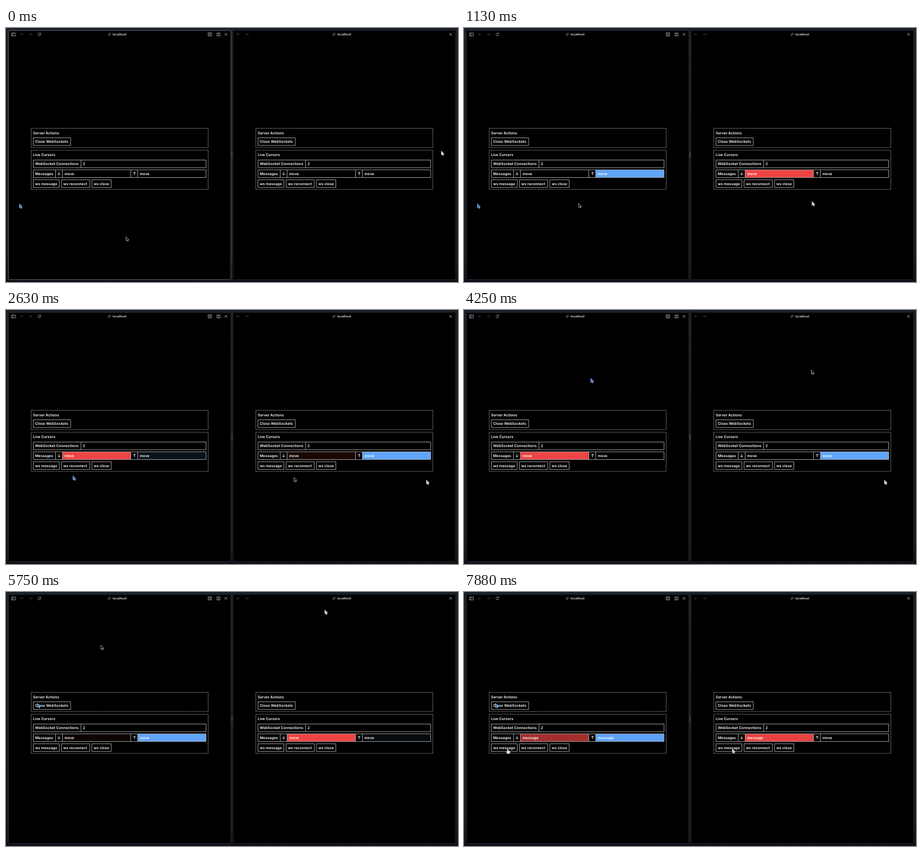
An HTML page with a canvas that plays this animation: 853x480 px, repeating every 8000 ms.

```html
<!DOCTYPE html>
<html lang="en">
<head>
<meta charset="utf-8">
<title>Live cursors</title>
<style>
  html, body { margin: 0; width: 100%; height: 100%; overflow: hidden; background: #000; }
  canvas { display: block; }
</style>
</head>
<body>
<canvas id="stage" width="853" height="480"></canvas>
<script>
const ctx = document.getElementById('stage').getContext('2d');
const LOOP = 8000, STEP = 125, LAG = 90, PANE = 424, CLICK = 7710;
const RED = '#ef4444', BLUE = '#60a5fa', LINE = '#a4a4a4';

// Turning points of the pointer: time, x, y
const path = [
  [0, 226, 394], [750, 304, 278], [1125, 216, 331], [1500, 250, 205], [1875, 369, 321],
  [2250, 539, 301], [2625, 543, 316], [3000, 485, 310], [3400, 610, 145], [3800, 650, 230],
  [4250, 655, 113], [4625, 540, 170], [4990, 483, 210], [5160, 308, 201], [5250, 303, 200],
  [5620, 180, 20], [6020, 230, 340], [6280, 366, 250], [6660, 114, 268], [6750, 103, 275],
  [7000, 54, 296], [7300, 82, 296]
];
// Spans during which the pointer is inside each window
const inLeft = [[250, 1875], [5090, 7345]];
const inRight = [[2000, 4990]];
const click = [CLICK, LOOP];

const clamp = v => Math.max(0, Math.min(1, v));

// Smooth curve through the turning points
function pointer(t) {
  const last = path.length - 1;
  if (t >= path[last][0]) return path[last].slice(1);
  const i = path.findIndex(p => p[0] > t) - 1;
  const a = path[Math.max(0, i - 1)], b = path[i], c = path[i + 1], d = path[Math.min(last, i + 2)];
  const span = c[0] - b[0], s = (t - b[0]) / span;
  return [1, 2].map(k => {
    const m0 = (c[k] - a[k]) / (c[0] - a[0]) * span;
    const m1 = (d[k] - b[k]) / (d[0] - b[0]) * span;
    return b[k] + s * (m0 + s * (3 * (c[k] - b[k]) - 2 * m0 - m1 + s * (2 * (b[k] - c[k]) + m0 + m1)));
  });
}

// Delayed position, resting where the pointer last left the window
function remote(t, spans, rest, shift) {
  const started = spans.filter(s => s[0] <= t - LAG);
  if (!started.length) return rest;
  const [x, y] = pointer(Math.min(t - LAG, started.at(-1)[1]));
  return [x + shift, y];
}

const flash = (t, spans) => Math.max(...spans.map(([from, to]) =>
  clamp(Math.min((t - from) / 240, 1 - (t - to - 525) / 250))));

function text(str, x, y, size = 6.9, color = '#fff') {
  ctx.font = `600 ${size}px Inter, sans-serif`;
  ctx.fillStyle = color;
  ctx.fillText(str, x, y);
}

function stroke(d, color = LINE, width = 1) {
  ctx.strokeStyle = color;
  ctx.lineWidth = width;
  ctx.stroke(new Path2D(d));
}

function box(x, y, right, bottom) {
  stroke(`M${x} ${y}H${right}V${bottom}H${x}Z`);
}

function section(title, top, bottom) {
  ctx.setLineDash([1.5, 1]);
  box(47.5, top, 381.5, bottom);
  ctx.setLineDash([]);
  text(title, 51, top + 11.3);
}

function button(label, x, y, right) {
  box(x, y, right, y + 14.5);
  text(label, x + 3.5, y + 9.7);
}

function bar(x, label, color, level) {
  ctx.globalAlpha = level;
  ctx.fillStyle = color;
  ctx.fillRect(x, 268, 128.5, 14);
  ctx.globalAlpha = 1;
  text(label, x + 3.4, 277.7);
}

function pane(shift, down, up, downLabel, upLabel) {
  ctx.save();
  ctx.translate(shift, 0);
  section('Server Actions', 189.5, 226);
  section('Live Cursors', 231, 305);
  button('Close WebSockets', 51.5, 207.5, 122);

  button('WebSocket Connections', 51.5, 249.5, 377.5);
  stroke('M141.5 249.5v14.5');
  text('2', 145, 259.2);

  bar(107, downLabel, RED, down);
  bar(249, upLabel, BLUE, up);
  button('Messages', 51.5, 268, 377.5);
  stroke('M93.5 268v14M106.5 268v14M235.5 268v14M248.5 268v14');
  stroke('M100 272v6M97.5 275.5l2.5 2.5 2.5-2.5M242.5 278v-6M240 274.5l2.5-2.5 2.5 2.5', '#fff', .9);

  button('ws message', 51.5, 286.8, 100.5);
  button('ws reconnect', 104.5, 286.8, 158);
  button('ws close', 162, 286.8, 198.5);

  stroke('M194.2 10.8l1-1a1.5 1.5 0 0 1 2 2l-1.2 1.2M195.8 13.2l-1 1a1.5 1.5 0 0 1-2-2l1.2-1.2M194 13l2-2', '#aaa', .7);
  text('localhost', 201.2, 14, 5.9, '#e4e4e4');
  ctx.restore();
}

function windows(t) {
  const edge = ctx.createLinearGradient(0, 0, 0, 480);
  edge.addColorStop(0, '#1a2028');
  edge.addColorStop(.9, '#171b22');
  edge.addColorStop(1, '#130e1a');
  ctx.fillStyle = edge;
  ctx.fillRect(0, 0, 853, 480);
  // The left frame dims as the window loses its highlight
  const glow = 44 + 50 * (1 - clamp((t - 125) / 600));
  for (const [x, level] of [[4.5, glow], [428.5, 32]]) {
    ctx.beginPath();
    ctx.roundRect(x, 4.5, 420, 471, 2);
    ctx.fillStyle = '#000';
    ctx.fill();
    ctx.strokeStyle = `rgb(${level} ${level + 4} ${level + 10})`;
    ctx.lineWidth = 1;
    ctx.stroke();
  }
  stroke('M426.5 235V245', '#555b64');

  const back = x => `M${x + 3} 12h-6m2.5-2.5l-2.5 2.5 2.5 2.5`;
  const forward = x => `M${x - 3} 12h6m-2.5-2.5l2.5 2.5-2.5 2.5`;
  const close = x => `M${x - 2.5} 9.5l5 5m0-5l-5 5`;
  stroke(back(30.5) + forward(46.5) + back(438) + forward(454.5), '#454545', .8);
  stroke('M10.5 9.5h7v5.5h-7zM13 9.5v5.5M65.3 10.8a2.6 2.6 0 1 0 .3 2M65.6 9v2h-2' +
    'M381.5 9h6.5v6h-6.5zM383 11h3.5M383 13h3.5M398 9.5h6v5.5h-6zM401 9.5v5.5' +
    close(415) + close(839), '#c0c0c0', .8);
}

const arrow = new Path2D('M0 0V7.6L1.8 6.1 3.1 8.7 4.3 8.1 3.1 5.6H5.3Z');
const hand = new Path2D('M-.8 .6Q0-.6 .8 .6V3.2L3.8 4Q4.8 4.5 4.4 6L3.6 8.8H-.6L-2.8 5.6Q-2.6 4.4-.8 5.6Z');

function cursor([x, y], fill, outline, shape = arrow) {
  ctx.save();
  ctx.translate(x + .5, y + .5);
  ctx.fillStyle = fill;
  ctx.strokeStyle = outline;
  ctx.lineWidth = .8;
  ctx.lineJoin = 'round';
  ctx.fill(shape);
  ctx.stroke(shape);
  ctx.restore();
}

function draw(t) {
  ctx.textRendering = 'geometricPrecision';
  windows(t);
  const label = t >= CLICK ? 'message' : 'move';
  const fromLeft = flash(t, [...inLeft, click]);
  pane(0, flash(t, [...inRight, click]), fromLeft, label, label);
  pane(PANE, fromLeft, flash(t, inRight), label, 'move');

  cursor(remote(t, inRight, [25, 332], -PANE), '#2f6fe0', '#b4cdf2');
  cursor(remote(t, inLeft, [821, 232], PANE), '#e6d6d6', '#cfcfcf');
  const [x, y] = pointer(t);
  const overButton = x > 51 && x < 101 && y > 287 && y < 302;
  if (overButton) cursor([x, y], '#eee', '#aaa', hand);
  else cursor([x, y], '#000', '#ccc');
}

function tick(now) {
  draw(Math.floor(now % LOOP / STEP) * STEP);
  requestAnimationFrame(tick);
}
requestAnimationFrame(tick);
</script>
</body>
</html>
```
